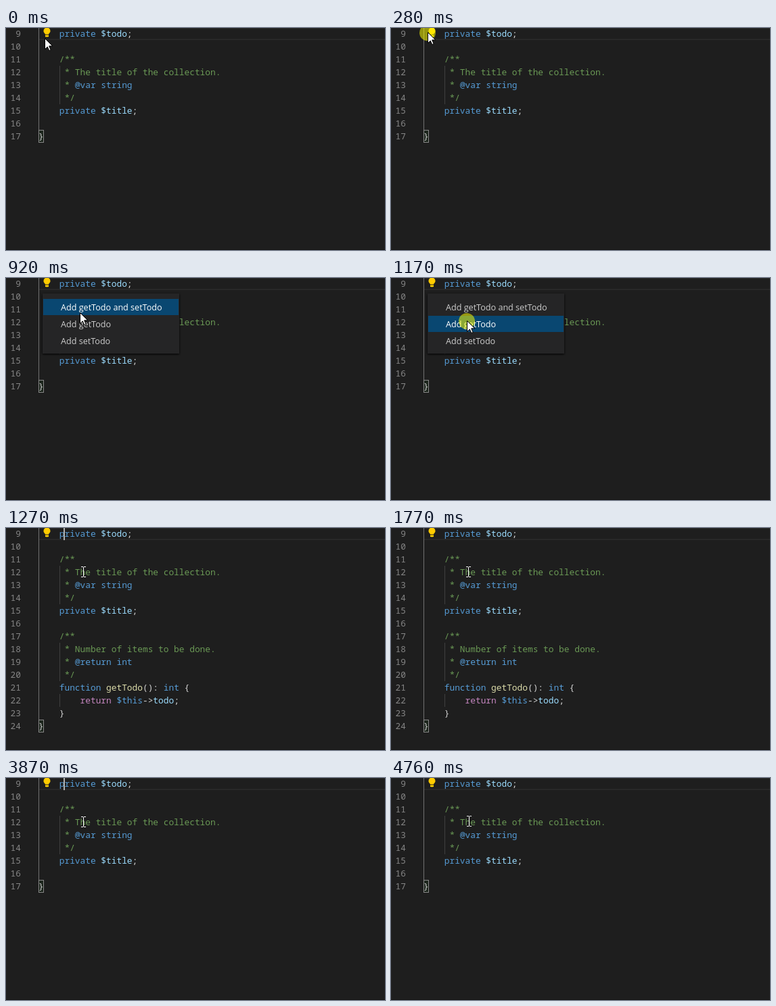
Write an HTML page that moves like this. It is 560 px wide and 329 px high and loops after 4890 ms.

```html
<!DOCTYPE html>
<html lang="en">
<head>
<meta charset="utf-8">
<title>Getter quick fix</title>
<style>
  html, body { margin: 0; width: 100%; height: 100%; overflow: hidden; background: #1e1e1e; }
  svg { display: block; }
  text { white-space: pre; }
  .code { font: 12.83px "Noto Sans Mono", "DejaVu Sans Mono", monospace; }
  .menu { font: 12.6px "Open Sans", "Noto Sans", sans-serif; }
  .num { fill: #858585; text-anchor: end; }
  .k { fill: #569cd6; }
  .v { fill: #9cdcfe; }
  .c { fill: #6a9955; }
  .f { fill: #dcdcaa; }
  .r { fill: #c586c0; }
  .p { fill: #d4d4d4; }
</style>
</head>
<body>
<svg id="stage" width="560" height="329" viewBox="0 0 560 329">
  <rect width="560" height="329" fill="#1e1e1e"/>
  <path d="M48 0H560V1H48zM48 16H560V18H48z" fill="#282828"/>
  <rect y="328" width="560" height="1" fill="#151515"/>
  <g id="shared" class="code"></g>
  <g id="before" class="code"></g>
  <g id="after" class="code"></g>
  <g id="bulb" fill="#fc0">
    <path d="M58 9.6C58 7.6 55.5 7.2 55.5 4.4A5 5 0 0 1 65.5 4.4C65.5 7.2 63 7.6 63 9.6z"/>
    <path d="M58 10.5H63V12.2L62 13.2H59L58 12.2z"/>
  </g>
  <rect id="caret" x="85" width="2" height="18" fill="#aeafad"/>
  <g id="menu" class="menu">
    <rect x="54" y="23" width="202" height="89" fill="#252526" style="filter:drop-shadow(0 1px 1.5px #000)"/>
    <rect id="hover" x="55" width="200" height="24" fill="#094771"/>
  </g>
  <circle id="click" r="12" fill="#ff0" fill-opacity=".53"/>
  <path id="arrow" d="M.5 .5V16.5L4.3 12.9L6.8 18.5L9.1 17.5L6.7 11.8H11.8z" fill="#fff" stroke="#000"/>
  <path id="beam" d="M0 .5H3M4 .5H7M3.5 1V15M0 15.5H3M4 15.5H7" fill="none" stroke="#fff"/>
</svg>
<script>
const LOOP = 4890, LINE = 19, LEFT = 48, COL = 7.698;
const $ = id => document.getElementById(id);

function add(parent, tag, attrs, text = "") {
  const el = document.createElementNS("http://www.w3.org/2000/svg", tag);
  for (const key in attrs) el.setAttribute(key, attrs[key]);
  el.textContent = text;
  parent.append(el);
  return el;
}

const lineTop = n => (n - 9) * LINE - 1;

// Tokens are written as "class:text".
function line(parent, n, col = 0, ...tokens) {
  const y = lineTop(n) + 14;
  add(parent, "text", { x: 22, y, class: "num" }, n);
  const row = add(parent, "text", { x: LEFT + col * COL, y });
  for (const token of tokens) add(row, "tspan", { class: token[0] }, token.slice(2));
}

function guide(parent, x, from, to, fill) {
  const y = Math.max(0, lineTop(from));
  add(parent, "rect", { x, y, width: 1, height: lineTop(to) - y, fill });
}

function doc(parent, n, title, tag, type) {
  guide(parent, 79, n + 1, n + 4, "#404040");
  line(parent, n, 4, "c:/**");
  line(parent, n + 1, 4, "c: * " + title);
  line(parent, n + 2, 4, "c: * ", "k:" + tag + " " + type);
  line(parent, n + 3, 4, "c: */");
}

function closing(parent, n) {
  guide(parent, LEFT, 9, n, "#707070");
  add(parent, "rect", { x: 48.5, y: lineTop(n) + .5, width: 7, height: 18, fill: "#1c251c", stroke: "#888" });
  line(parent, n, 0, "p:}");
}

const shared = $("shared"), before = $("before"), after = $("after");
line(shared, 9, 4, "k:private", "v: $todo", "p:;");
line(shared, 10);
doc(shared, 11, "The title of the collection.", "@var", "string");
line(shared, 15, 4, "k:private", "v: $title", "p:;");
line(shared, 16);

closing(before, 17);

doc(after, 17, "Number of items to be done.", "@return", "int");
line(after, 21, 4, "k:function", "f: getTodo", "p:(): ", "k:int", "p: {");
guide(after, 79, 22, 23, "#404040");
line(after, 22, 8, "r:return", "k: $this", "p:->", "v:todo", "p:;");
line(after, 23, 4, "p:}");
closing(after, 24);

const items = ["Add getTodo and setTodo", "Add getTodo", "Add setTodo"]
  .map((label, i) => add($("menu"), "text", { x: 81, y: 48 + 25 * i }, label));

// Pointer positions: time, x, y
const arrowPath = [
  [0, 57, 15], [50, 57, 13], [110, 56, 9], [180, 54, 6],
  [610, 56, 8], [660, 61, 12], [700, 69, 19], [750, 79, 26], [790, 89, 34],
  [830, 98, 41], [880, 105, 47], [920, 109, 51], [970, 111, 58], [1020, 112, 63]
];
const beamPath = [[0, 111, 57], [4250, 111, 56], [4760, 112, 56]];

const at = (path, t) => path.findLast(step => step[0] <= t);
const within = (t, ...spans) => spans.some(([from, to]) => t >= from && t < to);
const show = (id, on) => $(id).setAttribute("visibility", on ? "visible" : "hidden");
const move = (id, x, y) => $(id).setAttribute("transform", `translate(${x} ${y})`);

function render(t) {
  const [, ax, ay] = at(arrowPath, t);
  const [, bx, by] = at(beamPath, t);
  const inserted = within(t, [1270, 3870]);
  const picked = ay >= 56 ? 1 : 0;

  show("before", !inserted);
  show("after", inserted);
  show("menu", within(t, [310, 1270]));
  show("click", within(t, [250, 380], [1170, 1270]));
  show("arrow", t < 1270);
  show("beam", t >= 1270);
  show("caret", within(t, [1270, 1770], [3230, 3740], [3870, 4400]));

  move("arrow", ax, ay);
  move("click", ax, ay + 1);
  move("beam", bx, by);
  $("hover").setAttribute("y", 31 + 25 * picked);
  items.forEach((item, i) => item.setAttribute("fill", i === picked ? "#fff" : "#ccc"));
}

const start = performance.now();
function tick() {
  render(Math.max(0, performance.now() - start) % LOOP);
  requestAnimationFrame(tick);
}
tick();
</script>
</body>
</html>
```
